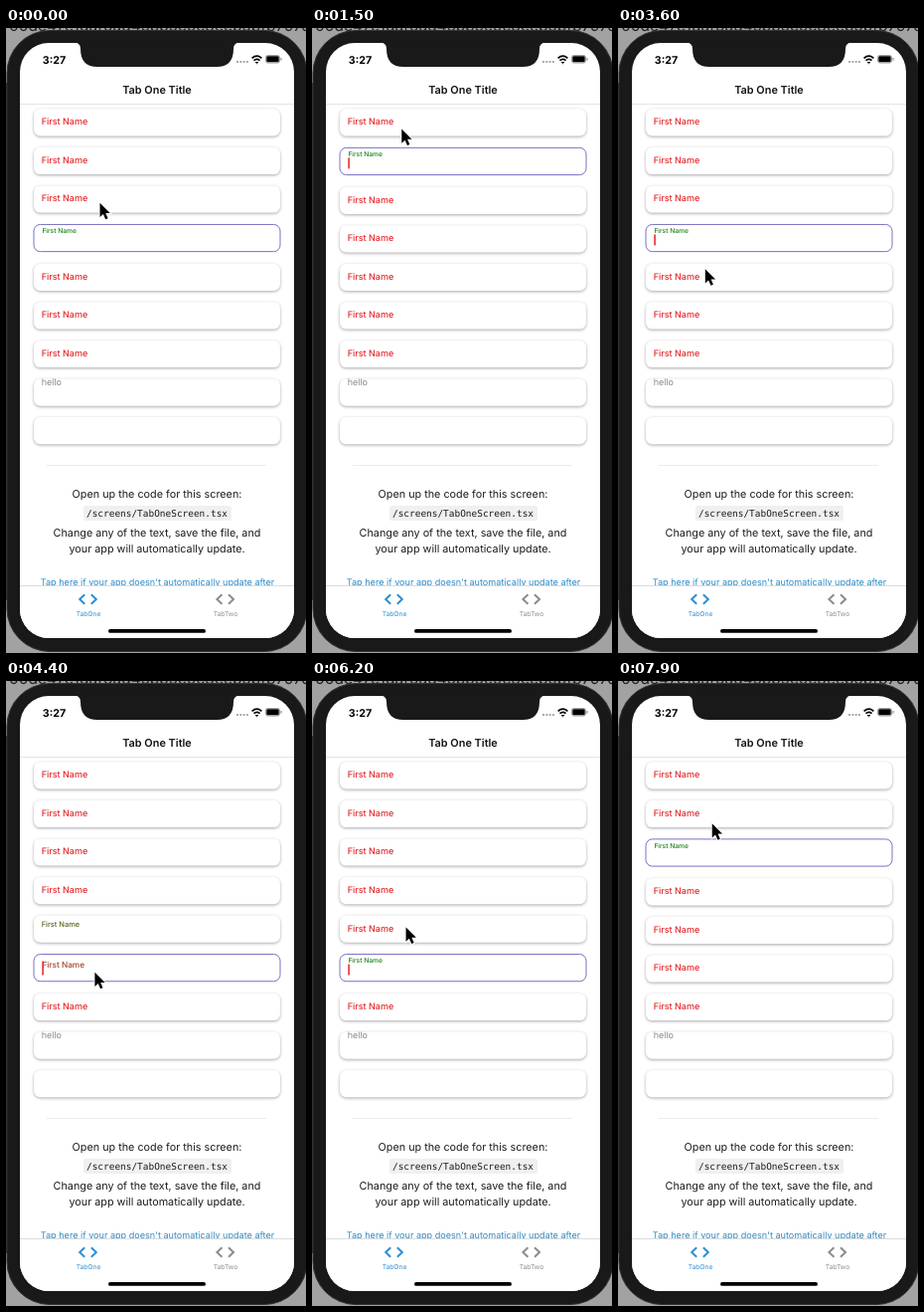
These frames come from a looping animation (302x628 px, 8 s). An HTML page:

```html
<!DOCTYPE html>
<html lang="en">
<head>
<meta charset="utf-8">
<title>Tab One</title>
<style>
  html, body { margin: 0; width: 100%; height: 100%; overflow: hidden; background: #a2a2a2; }
  svg { display: block; width: 302px; height: 628px; }
  text { font-family: Inter, sans-serif; text-rendering: geometricPrecision; }
  .mid { text-anchor: middle; }
  .body { font-size: 10.8px; fill: #1c1c1c; }
  .code { font: 9.45px "DejaVu Sans Mono", monospace; fill: #1c1c1c; }
  .tab { font-size: 6.7px; }
  .box { fill: #fff; filter: drop-shadow(0 1.4px 1.7px rgba(0, 0, 0, .34)); }
  .box.on { filter: none; stroke: #7a70c2; }
  .label { font-weight: 500; }
</style>
</head>
<body>
<svg viewBox="0 0 302 628">
  <defs>
    <path id="chevrons" d="M-3.3-4.8-8.3 0l5 4.8M3.3-4.8 8.3 0l-5 4.8" fill="none" stroke-width="2"/>
  </defs>

  <!-- Desktop and phone -->
  <rect width="302" height="628" fill="#a2a2a2"/>
  <text x="3" y="3" font-size="15.5" fill="#222">00de47e1daf6ad45bb5c9c3eeb5bfb797dap</text>
  <path d="M.5 55V575" stroke="#303030"/>
  <rect x="1" y="2.5" width="302" height="624" rx="43" fill="#191919" stroke="#333"/>
  <rect x="14" y="15" width="276" height="598" rx="29" fill="#fff"/>
  <path d="M69 14.5Q75 15 75 21q0 18 17 18H212q17 0 17-18 0-6 6-6.5z" fill="#191919"/>

  <!-- Status bar and header -->
  <text class="mid" x="48.5" y="35.5" font-size="10.7" font-weight="700">3:27</text>
  <path d="M232 34h12" stroke="#aaa" stroke-width="2" stroke-dasharray="2 1.3"/>
  <g fill="none" stroke="#000" stroke-width="1.7">
    <path d="M247.6 30.3q4.9-4.4 9.8 0M249.5 32.7q3-2.6 6 0"/>
    <path d="M251.2 34.5h2.6l-1.3 1.2z" stroke-width="1"/>
  </g>
  <rect x="261.5" y="27.5" width="14" height="7.5" rx="2" fill="none" stroke="#777" stroke-width=".7"/>
  <rect x="262.3" y="28.3" width="12.4" height="5.9" rx="1.2"/>
  <path d="M277 30v2.6" stroke="#777"/>
  <text class="mid" x="152" y="66" font-size="10.9" font-weight="600" fill="#111">Tab One Title</text>
  <path d="M14 76.5H290" stroke="#e4e4e4"/>

  <g id="form"></g>

  <!-- Help text -->
  <path d="M41 439.5H262" stroke="#ececec"/>
  <text class="mid body" x="152" y="472">Open up the code for this screen:</text>
  <rect x="78" y="480" width="149" height="15" rx="2" fill="#f0f0f0"/>
  <text class="mid code" x="152" y="491">/screens/TabOneScreen.tsx</text>
  <text class="mid body" x="152" y="511">Change any of the text, save the file, and</text>
  <text class="mid body" x="152" y="527.3">your app will automatically update.</text>
  <text class="mid" x="152.5" y="560" font-size="9.1" fill="#2e8bc4">Tap here if your app doesn't automatically update after</text>

  <!-- Tab bar -->
  <path d="M14 560H290v24a29 29 0 0 1-29 29H43a29 29 0 0 1-29-29z" fill="#fff"/>
  <path d="M14 560.5H290" stroke="#dcdcdc"/>
  <use href="#chevrons" x="82.5" y="574" stroke="#2e8fd2"/>
  <use href="#chevrons" x="220.7" y="574" stroke="#8c8c8c"/>
  <text class="mid tab" x="83" y="591.4" fill="#2e8fd2">TabOne</text>
  <text class="mid tab" x="221" y="591.4" fill="#8c8c8c">TabTwo</text>
  <rect x="103" y="604" width="98" height="3.8" rx="1.9"/>

  <path id="pointer" d="M0 1V15.2L3.3 12.2 5.7 17.5 8.1 16.5 5.8 11.3H10.3z"
        stroke="#fff" stroke-width="1.8" paint-order="stroke"/>
</svg>
<script>
const LOOP = 8000, FADE = 200, TOP = 81.3, STEP = 38.55, GROW = 1.3;
const RED = [228, 38, 42], GREEN = [24, 128, 24];

// [time, field]: each tap focuses a field, and the pointer travels from tap to tap
const taps = [[-700, 3], [330, 2], [880, 1], [1800, 0], [2650, 2], [3200, 3], [3800, 4],
  [4320, 5], [4925, 6], [5590, 5], [6330, 4], [6750, 3], [7250, 2], [8500, 1]];

const form = document.getElementById('form');
const pointer = document.getElementById('pointer');
const mix = (a, b, p) => a + (b - a) * p;
const easeOut = p => 1 - (1 - p) ** 2;
const easeInOut = p => p < 0.5 ? 2 * p * p : 1 - 2 * (1 - p) ** 2;

function set(el, attrs) {
  for (const key in attrs) el.setAttribute(key, attrs[key]);
  return el;
}
function add(tag, attrs) {
  return form.appendChild(set(document.createElementNS('http://www.w3.org/2000/svg', tag), attrs));
}

const rowTop = i => TOP + i * STEP;
const addBox = i => add('rect', { class: 'box', x: 28, y: rowTop(i) + GROW, width: 248, height: 27.2, rx: 6.5 });
const fields = Array.from({ length: 7 }, (_, i) => {
  const box = addBox(i), label = add('text', { class: 'label' });
  label.textContent = 'First Name';
  return { box, label };
});
addBox(7);
addBox(8);
add('text', { x: 35.7, y: 359.2, 'font-size': 9, fill: '#8a8a8a' }).textContent = 'hello';
const caret = add('rect', { x: 36.3, width: 1.6, fill: '#ee2b30' });

function drawField({ box, label }, y, on, p) {
  const size = mix(9, 6.7, p);
  set(box, { class: on ? 'box on' : 'box', y: on ? y + 0.5 : y });
  set(label, {
    x: on ? 36.4 : 35.7,
    y: y + mix(12.8, 6.7, p) + size * 0.36,
    'font-size': size,
    fill: `rgb(${RED.map((c, k) => Math.round(mix(c, GREEN[k], p)))})`
  });
}

function draw(t) {
  const n = taps.findLastIndex(tap => tap[0] <= t);
  const [start, focus] = taps[n], [end, next] = taps[n + 1];
  const previous = n ? taps[n - 1][1] : -1;
  const age = t - start;
  const shown = easeInOut(Math.min(1, age / FADE));

  fields.forEach((field, i) => {
    const p = i === focus ? shown : i === previous ? 1 - shown : 0;
    drawField(field, rowTop(i) + (i > focus ? GROW : 0), i === focus, p);
  });

  const top = mix(6, 10.5, shown);
  set(caret, { y: rowTop(focus) + top, height: 21.5 - top, opacity: age % 1000 < 640 ? 1 : 0 });

  const x = 91.5 - 4 * Math.cos((t - 3100) / LOOP * 2 * Math.PI);
  const y = 96.5 + 37.2 * mix(focus, next, easeOut(age / (end - start)));
  set(pointer, { transform: `translate(${x} ${y})` });
}

function frame() {
  draw(performance.now() % LOOP);
  requestAnimationFrame(frame);
}
frame();
</script>
</body>
</html>
```
